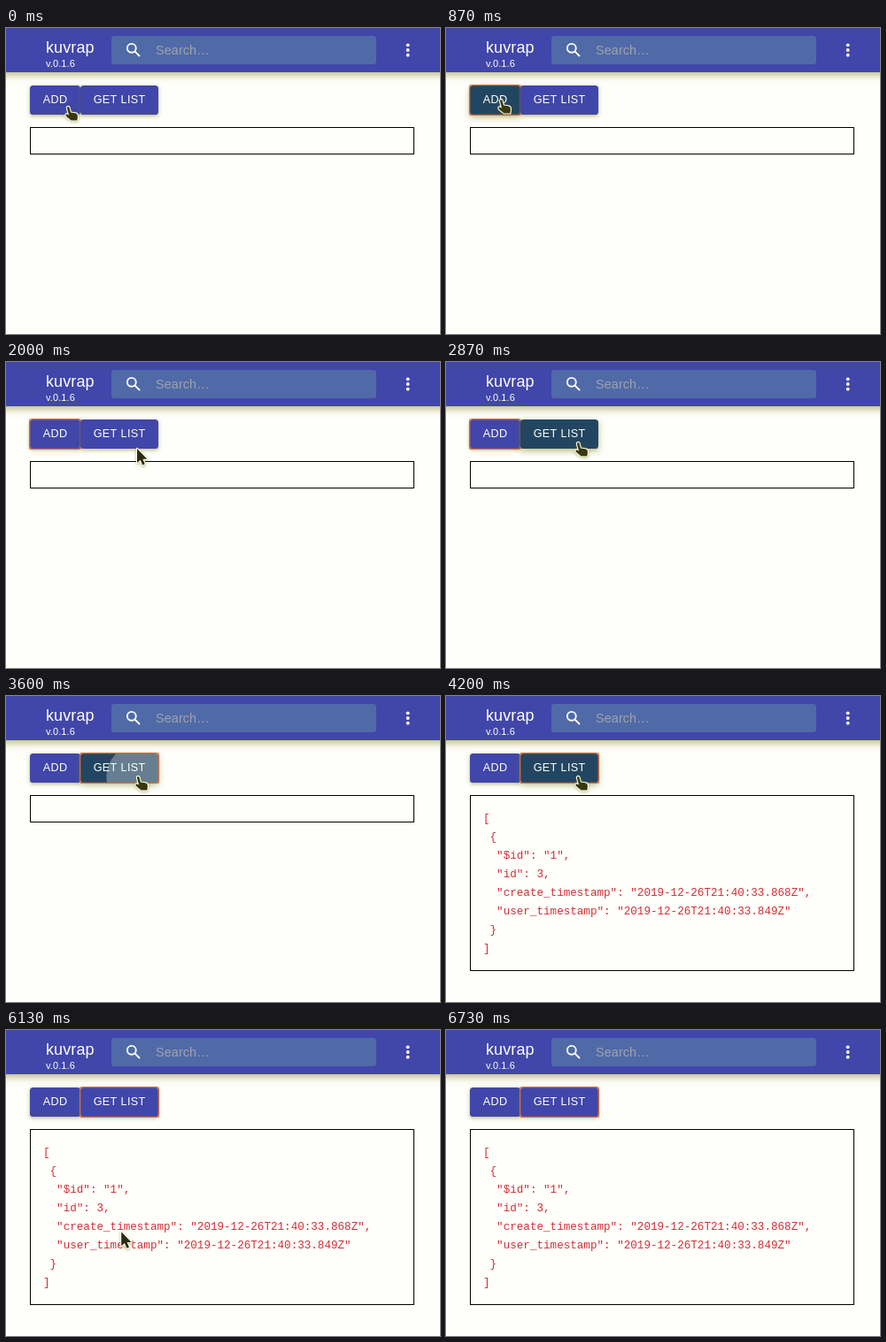
Recreate the animation shown at these times as an HTML page with a canvas. Size 490x346 px, loop 8390 ms.

```html
<!DOCTYPE html>
<html lang="en">
<head>
<meta charset="utf-8">
<title>Service list</title>
<style>
  html, body { margin: 0; width: 100%; height: 100%; overflow: hidden; background: #fefefa; }
  canvas { display: block; width: 490px; height: 346px; }
</style>
</head>
<body>
<canvas id="stage" width="490" height="346"></canvas>
<script>
const LOOP = 8390, STEP = 1000 / 15, FADE = 250;
const LIST_SHOWN = 3660, CURSOR_GONE = 6710;
const ctx = document.getElementById('stage').getContext('2d');
const SANS = '"Liberation Sans", Arial, sans-serif';
const MONO = '"Liberation Mono", "Courier New", monospace';
const PAGE = '#fefefa', WHITE = '#fffff4', BLUE = [65, 70, 170], DARK = [34, 70, 98];

const ADD = { x: 27, w: 57, label: 'ADD', enter: 70, leave: 1330, click: 400 };
const LIST = { x: 84, w: 88, label: 'GET LIST', enter: 2460, leave: 5190, click: 3465 };
const TOP = 65, HEIGHT = 33;

// Each move starts where the previous one ended; via bends the path
const START = { x: 70, y: 89 };
const MOVES = [
  { from: 70, until: 330, to: { x: 62, y: 81 } },
  { from: 1200, until: 1980, to: { x: 148, y: 98 }, via: { x: 110, y: 120 } },
  { from: 2270, until: 2600, to: { x: 149, y: 91 } },
  { from: 5130, until: 5930, to: { x: 160, y: 207 }, via: { x: 136, y: 101 } },
  { from: 6000, until: 6670, to: { x: 14, y: 311 } }
];

const RESPONSE = [
  '[', ' {', '  "$id": "1",', '  "id": 3,',
  '  "create_timestamp": "2019-12-26T21:40:33.868Z",',
  '  "user_timestamp": "2019-12-26T21:40:33.849Z"', ' }', ']'
];

const ARROW = new Path2D('M0 0V16L3.7 12.8 6.2 18.6 8.8 17.5 6.4 11.8H11.4Z');
const HAND = new Path2D('M-1.2 1Q0 -1 1.4 .8L3 6.6 8.4 7.3Q11 8 11 10.5' +
  'L10.4 15.5H3.6L-1.4 11.4Q-3.6 9-1.8 8.2L1 9.6Z');

const clamp = v => Math.min(1, Math.max(0, v));
const ramp = (t, from, length) => clamp((t - from) / length);
const lerp = (a, b, p) => a + (b - a) * p;
const between = (a, b, p) => ({ x: lerp(a.x, b.x, p), y: lerp(a.y, b.y, p) });
const mix = (a, b, p) => `rgb(${a.map((v, i) => Math.round(lerp(v, b[i], p)))})`;

function pointer(t) {
  let pos = START;
  for (const { from, until, to, via = between(pos, to, 0.5) } of MOVES) {
    if (t < from) break;
    const p = ramp(t, from, until - from);
    pos = between(between(pos, via, p), between(via, to, p), p);
  }
  return pos;
}

function text(str, x, y, size, color, spacing = 0, family = SANS) {
  ctx.font = `${size}px ${family}`;
  ctx.letterSpacing = `${spacing}px`;
  ctx.fillStyle = color;
  ctx.fillText(str, x, y);
}

function roundRect(x, y, w, h, r = 3.6) {
  ctx.beginPath();
  ctx.roundRect(x, y, w, h, r);
}

function disc(x, y, r, color) {
  ctx.fillStyle = color;
  ctx.beginPath();
  ctx.arc(x, y, r, 0, 2 * Math.PI);
  ctx.fill();
}

function shadow(dy, blur, alpha) {
  ctx.shadowColor = `rgba(120, 116, 0, ${alpha})`;
  ctx.shadowBlur = blur;
  ctx.shadowOffsetY = dy;
}

function searchIcon() {
  ctx.strokeStyle = WHITE;
  ctx.lineWidth = 1.9;
  ctx.beginPath();
  ctx.arc(141.8, 22.8, 4.95, 0, 2 * Math.PI);
  ctx.moveTo(145.6, 26.6);
  ctx.lineTo(151, 32);
  ctx.stroke();
}

function header() {
  ctx.save();
  shadow(2.5, 8, 0.5);
  ctx.fillStyle = `rgb(${BLUE})`;
  ctx.fillRect(-10, -10, 510, 60);
  ctx.restore();

  text('kuvrap', 45, 28, 18, WHITE, 0.1);
  text('v.0.1.6', 45, 44, 11, WHITE, 0.1);

  ctx.fillStyle = '#506aa8';
  roundRect(119, 9, 299, 32);
  ctx.fill();
  text('Search…', 169, 30, 14.4, '#a0a3ac', 0.1);
  searchIcon();
  for (let i = -1; i <= 1; i++) disc(453.7, 25 + 5.7 * i, 1.9, WHITE);
}

function ripple(b, t) {
  const age = t - b.click;
  if (age < 0) return;
  const { x, y } = pointer(b.click);
  ctx.save();
  roundRect(b.x, TOP, b.w, HEIGHT);
  ctx.clip();
  disc(x, y, 8 + 80 * ramp(age, 0, 400),
    `rgba(255, 255, 255, ${0.3 * (1 - ramp(age, 140, 300))})`);
  ctx.restore();
}

function button(b, t, focused) {
  const hover = ramp(t, b.enter, FADE) - ramp(t, b.leave, FADE);
  ctx.save();
  shadow(1.5 + hover, 4 + 3 * hover, 0.5);
  ctx.fillStyle = mix(BLUE, DARK, hover);
  roundRect(b.x, TOP, b.w, HEIGHT);
  ctx.fill();
  ctx.restore();
  ripple(b, t);
  if (focused) {
    ctx.strokeStyle = '#cc7040';
    ctx.lineWidth = 1.4;
    roundRect(b.x - 0.4, TOP - 0.4, b.w + 0.8, HEIGHT + 0.8, 2.5);
    ctx.stroke();
  }
  text(b.label, b.x + 14.7, 85, 12.6, WHITE, 0.36);
}

function output(shown) {
  ctx.strokeStyle = '#000';
  ctx.lineWidth = 1;
  ctx.strokeRect(27.5, 112.5, 433, shown ? 198 : 30);
  if (shown) RESPONSE.forEach((line, i) =>
    text(line, 42, 142 + 21 * i, 12.6, '#cf3038', 0, MONO));
}

function cursor(t) {
  if (t >= CURSOR_GONE) return;
  const { x, y } = pointer(t);
  const over = x > ADD.x && x < LIST.x + LIST.w && y > TOP && y < TOP + HEIGHT - 0.5;
  const shape = over ? HAND : ARROW;
  ctx.save();
  ctx.translate(x, y);
  ctx.lineJoin = 'round';
  ctx.lineWidth = 2.2;
  ctx.strokeStyle = WHITE;
  shadow(1, 3, 0.5);
  ctx.stroke(shape);
  ctx.shadowColor = 'transparent';
  ctx.fillStyle = over ? '#3a380e' : '#2c2a12';
  ctx.fill(shape);
  ctx.restore();
}

function draw(t) {
  ctx.fillStyle = PAGE;
  ctx.fillRect(0, 0, 490, 346);
  header();
  const listFocus = t >= LIST.click;
  button(ADD, t, t >= ADD.click && !listFocus);
  button(LIST, t, listFocus);
  output(t >= LIST_SHOWN);
  cursor(t);
}

// The picture advances 15 times a second
function frame() {
  const t = performance.now() % LOOP;
  const n = Math.floor((t - 62) / STEP);
  draw(Math.max(0, 70 + n * STEP));
  requestAnimationFrame(frame);
}
frame();
</script>
</body>
</html>
```
